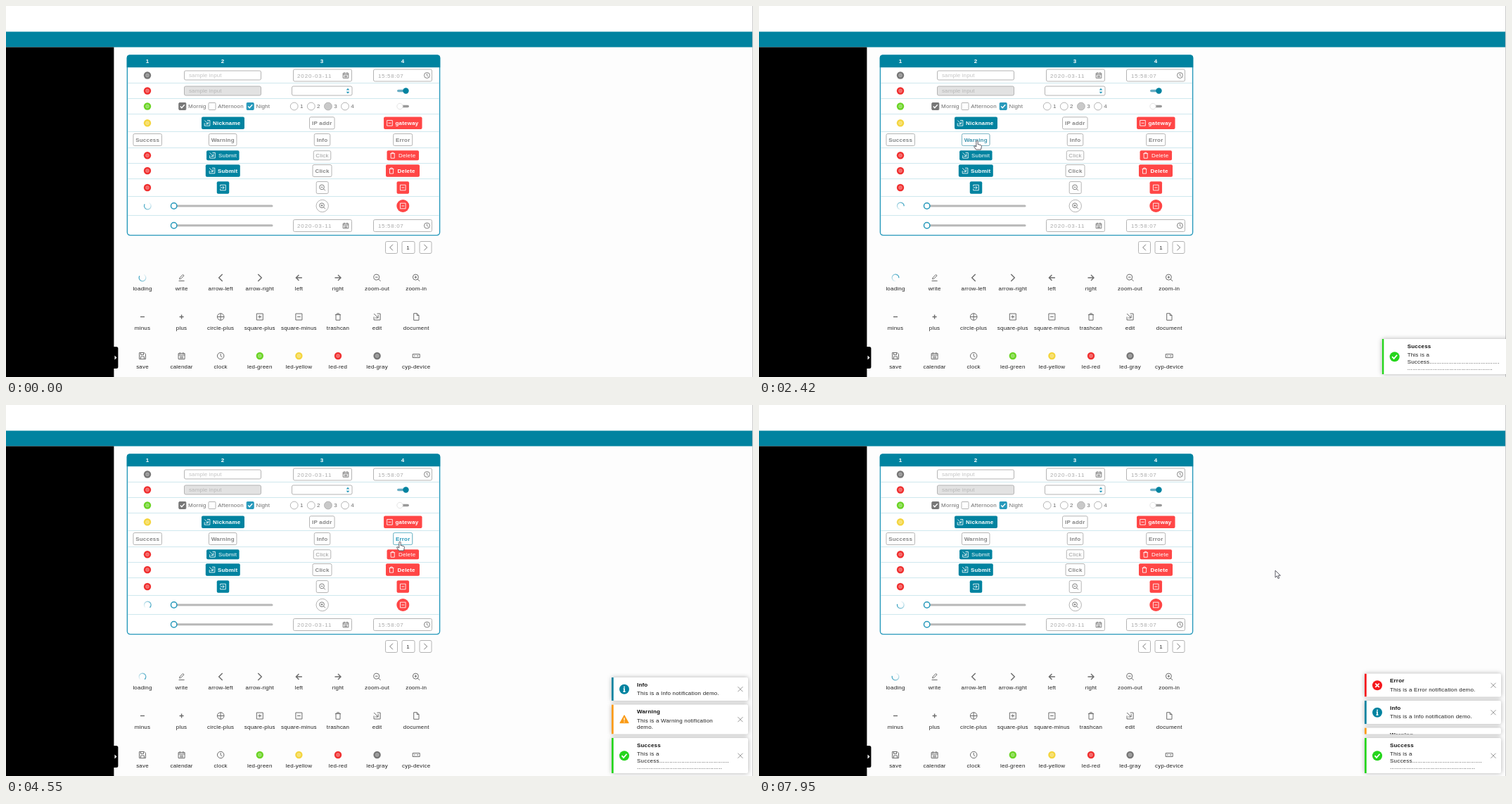
Write an HTML page that moves like this. It is 1062x527 px and loops after 8000 ms.

```html
<!DOCTYPE html>
<html lang="en">
<head>
<meta charset="utf-8">
<title>Component demo</title>
<style>
html, body { margin: 0; width: 100%; height: 100%; overflow: hidden; background: #fdfdfd; }
svg { position: absolute; left: 0; top: 0; }
text { font: 8px "Liberation Sans", Arial, sans-serif; white-space: pre; }
.b { font-weight: bold; }
.card { fill: #fff; filter: drop-shadow(0 0 3px rgba(0,0,0,.3)); }
</style>
</head>
<body>
<svg width="1062" height="527">
  <g id="page"></g>
  <g id="notes"></g>
  <path id="cursor" fill="#fff" stroke="#4a4a55" stroke-width=".9" stroke-linejoin="round"/>
</svg>
<script>
const TEAL = '#0083a0', BLUE = '#2799bb', RED = '#ff4646', GRAY = '#6c6c6c', EDGE = '#b4b4b4';
const LED = { green: '#6bd425', yellow: '#f4d53f', red: '#f03030', gray: '#777' };
const LOOP = 8000;

const ICON = {
  write: 'M-4 4.5H4M-3 2l.5-2L2-4.5 3.5-3-1 1.5z',
  'arrow-left': 'M2.5-5-2.5 0 2.5 5',
  'arrow-right': 'M-2.5-5 2.5 0-2.5 5',
  left: 'M4.5 0H-4M0-4-4 0 0 4',
  right: 'M-4.5 0H4M0-4 4 0 0 4',
  'zoom-out': 'M3.2-.8a4 4 0 1 1-8 0a4 4 0 1 1 8 0M2.1 2.1 5 5M-2.6-.8H1',
  'zoom-in': 'M3.2-.8a4 4 0 1 1-8 0a4 4 0 1 1 8 0M2.1 2.1 5 5M-2.6-.8H1M-.8-2.6V1',
  minus: 'M-3 0H3',
  plus: 'M-3 0H3M0-3V3',
  'circle-plus': 'M4.8 0a4.8 4.8 0 1 1-9.6 0a4.8 4.8 0 1 1 9.6 0M-4.8 0H4.8M0-4.8V4.8',
  'square-plus': 'M-4.5-4.5h9v9h-9zM-2.3 0H2.3M0-2.3V2.3',
  'square-minus': 'M-4.5-4.5h9v9h-9zM-2.3 0H2.3',
  trashcan: 'M-4-3H4M-1.5-3v-1.7h3V-3M-3-3V4.7H3V-3',
  edit: 'M0-4.5H4.5V4.5H-4.5V0M-4.5-4.5 1.5 1.5M-2.5 1.5h4v-4',
  document: 'M-3.5-4.8H1L3.8-2V4.8H-3.5zM1-4.8V-2H3.8',
  save: 'M-4.5-4.5H2.5L4.5-2.5v7h-9zM-2.5-4.5v3h4v-3M-2.5 4.5v-3.5h5v3.5',
  calendar: 'M-4.5-3.5h9v8h-9zM-4.5-1.2h9M-2.3-5v2.5M2.3-5v2.5M-2.5 1h5M-2.5 2.8h5',
  clock: 'M4.7 0a4.7 4.7 0 1 1-9.4 0a4.7 4.7 0 1 1 9.4 0M0-3V0L2 2',
  'cyp-device': 'M-5-2.5H5V2.5H-5zM-3.3 0h2M0 0h1M2.3-1v2',
  enter: 'M-4.5-2V-4.5H4.5V4.5H-4.5V2M-4.5 0H2M-.5-2.5 2 0-.5 2.5'
};

const rect = (x, y, w, h, fill = '#fff', stroke = EDGE, r = 2) =>
  `<rect x="${x}" y="${y}" width="${w}" height="${h}" rx="${r}" fill="${fill}" stroke="${stroke}"/>`;
const circle = (x, y, r, fill, stroke = 'none', w = 1) =>
  `<circle cx="${x}" cy="${y}" r="${r}" fill="${fill}" stroke="${stroke}" stroke-width="${w}"/>`;
const text = (s, x, y, fill = '#222', bold, mid, gap = .2) =>
  `<text x="${x}" y="${y}" fill="${fill}" class="${bold ? 'b' : ''}" text-anchor="${mid ? 'middle' : 'start'}" letter-spacing="${gap}">${s}</text>`;
const path = (d, x, y, color = GRAY, w = 1, scale = 1) =>
  `<path d="${d}" transform="translate(${x} ${y}) scale(${scale})" fill="none" stroke="${color}" stroke-width="${w}"/>`;
const icon = (name, x, y, color, w, scale) => path(ICON[name], x, y, color, w, scale);
const led = (c, x, y) => circle(x, y, 5.2, LED[c]) + circle(x, y, 2.4, 'rgba(255,255,255,.25)', 'rgba(255,255,255,.3)', .9);

// Outlined button centred on x
const plain = (s, x, y, w, h = 17, bold = true, color = '#858585', edge = EDGE) =>
  rect(x - w / 2, y - h / 2, w, h, '#fff', edge) + text(s, x, y + 2.9, color, bold, true);
// Filled button with an icon before its label
const solid = (s, x, y, w, h, fill, name, iconX, textX, bold) =>
  rect(x - w / 2, y - h / 2, w, h, fill, 'none') + icon(name, iconX, y, '#fff', 1, .85) + text(s, textX, y + 2.9, '#fff', bold);

function spinner(x, y) {
  let s = '';
  for (let i = 0; i < 12; i++)
    s += `<circle r="4.8" fill="none" stroke="${BLUE}" stroke-width="1.2" pathLength="360" stroke-dasharray="24 336"
      opacity="${.1 + i * .08}" transform="rotate(${-45 + i * 23})"/>`;
  return `<g transform="translate(${x} ${y})"><g class="spin">${s}</g></g>`;
}
const slider = y => `<path d="M239 ${y}H378" stroke="#b8b8b8" stroke-width="3" stroke-linecap="round"/>` +
  circle(238.7, y, 4.2, '#fff', BLUE, 1.5);
const dateTime = y =>
  rect(408.5, y - 8.5, 83, 17) + text('2020-03-11', 414, y + 3, '#aaa', 0, 0, .9) + icon('calendar', 483, y, GRAY, 1, .85) +
  rect(522.5, y - 8.5, 83, 17) + text('15:58:07', 529, y + 3, '#aaa', 0, 0, .65) + icon('clock', 598.5, y, GRAY, 1, .85);
const check = (x, fill, edge, label) => rect(x, 137.5, 10, 10, fill, edge, 1) +
  path('M-3 0-1 2.2 3-2.3', x + 5, 142.5, '#fff', 1.4) + text(label, x + 13.3, 145.4, GRAY);

const hoverButtons = [
  { label: 'Success', x: 201.2, w: 40.5, from: 930, to: 2130 },
  { label: 'Warning', x: 308.2, w: 39.5, from: 2230, to: 2800 },
  { label: 'Info', x: 449.5, w: 22.5, from: 2990, to: 3720 },
  { label: 'Error', x: 564.2, w: 27, from: 4080, to: 4690 }
];

function buildPage() {
  let s = `<path d="M0 0H1062V37H0z" fill="#fff"/><path d="M1061.5 0V527" stroke="#ccc"/>
    <path d="M0 36.4H1061V58.4H0z" fill="${TEAL}"/>
    <path d="M0 58.4H153.4V484h3.5q2.5 0 2.5 2.5v26q0 2.5-2.5 2.5h-3.5V527H0z"/><path d="M154.5 496.5 157.5 499.5 154.5 502.5z" fill="#fff"/>`;
  s += `<rect x="172.4" y="70" width="444.2" height="255.6" rx="4" fill="#fff" stroke="${BLUE}" stroke-width="1.4"/>
    <path d="M171.7 87.3V73.5q0-4 4-4H613.300q4 0 4 4V87.3z" fill="${TEAL}"/>`;
  [201, 308, 449, 564].forEach((x, i) => s += text(i + 1, x, 81, '#fff', true, true));
  for (const y of [109.5, 131.5, 153.5, 178.5, 201.5, 223.5, 245.5, 270.5, 297.5])
    s += `<path d="M173 ${y}H616" stroke="#cfe8ee"/>`;
  [['gray', 98.5], ['red', 120.5], ['green', 142.5], ['yellow', 166.3], ['red', 212.3], ['red', 234], ['red', 258]]
    .forEach(([c, y]) => s += led(c, 201, y));

  s += rect(253.5, 92, 109, 13) + text('sample input', 260, 101, '#c4c4c4', 0, 0, .1);
  s += rect(253.5, 114, 109, 13, '#e2e2e2') + text('sample input', 260, 123, '#b8b8b8', 0, 0, .1);
  s += dateTime(98.5) + dateTime(312);
  s += rect(406.5, 114, 85.5, 13) + `<path d="M483.7 119.5h4.6L486 116.8zM483.7 121.7h4.6L486 124.4z" fill="${BLUE}"/>`;
  s += rect(556, 118.7, 13, 3.6, '#68adc4', 'none') + circle(568.5, 120.5, 4.2, TEAL);
  s += rect(560, 140.8, 13, 3.4, '#999', 'none') + circle(560, 142.5, 4.2, '#fff', '#ddd', .8);

  s += check(245.8, '#777', '#777', 'Mornig') + check(288, '#fff', EDGE, 'Afternoon') + check(342.2, BLUE, BLUE, 'Night');
  for (let i = 0; i < 4; i++)
    s += circle(409.7 + 24.1 * i, 142.5, 5.4, i == 2 ? '#c9c9c9' : '#fff', EDGE) + text(i + 1, 418 + 24.1 * i, 145.4, GRAY);

  s += solid('Nickname', 308.5, 166.3, 61, 17.5, TEAL, 'edit', 286, 294, true) + plain('IP addr', 449.3, 166.3, 35.5) +
    solid('gateway', 564.3, 166.3, 54.5, 17.5, RED, 'square-minus', 545.5, 553.5, true);
  hoverButtons.forEach(b => s += plain(b.label, b.x, 190, b.w) +
    `<g class="hot" opacity="0">${plain(b.label, b.x, 190, b.w, 17, true, BLUE, '#6bb9cc')}</g>`);
  s += solid('Submit', 308.3, 212.2, 46.5, 14, TEAL, 'edit', 293.5, 302) + plain('Click', 449.5, 212.2, 24.5, 13, false, '#999') +
    solid('Delete', 564.3, 212.2, 45.5, 14, RED, 'trashcan', 549.7, 558);
  s += solid('Submit', 308.3, 234, 49, 17.5, TEAL, 'edit', 293, 301, true) + plain('Click', 449.5, 234, 27) +
    solid('Delete', 564, 234, 48, 17.5, RED, 'trashcan', 548, 556.5, true);
  s += solid('', 308.5, 258, 17.5, 17.5, TEAL, 'enter', 308.5, 0) + plain('', 449.7, 258, 17) + icon('zoom-out', 449.7, 258, GRAY, 1, .85) +
    solid('', 564.3, 258, 17.5, 17.5, RED, 'square-minus', 564.3, 0);
  s += spinner(201.3, 284) + slider(284) + circle(449.7, 284, 8.7, '#fff', EDGE) + icon('zoom-in', 449.7, 284, GRAY, 1, .85) +
    circle(564.3, 284, 9, RED) + icon('square-minus', 564.3, 284, '#fff', 1, .85);
  s += slider(311.7);

  s += rect(539.5, 334.5, 17, 17) + rect(563, 334.5, 18, 17) + rect(588, 334.5, 17, 17) + text('1', 571.5, 346, '#333', 0, true) +
    icon('arrow-left', 547.8, 343, GRAY, 1.1, .85) + icon('arrow-right', 596.5, 343, GRAY, 1.1, .85);

  ['loading write arrow-left arrow-right left right zoom-out zoom-in',
    'minus plus circle-plus square-plus square-minus trashcan edit document',
    'save calendar clock led-green led-yellow led-red led-gray cyp-device'].forEach((row, j) =>
    row.split(' ').forEach((name, i) => {
      const x = 194 + 55.6 * i, y = 386 + 55.5 * j;
      const bold = /^(arrow|left|right|minus|plus)/.test(name);
      s += name == 'loading' ? spinner(x, y) : name.startsWith('led') ? led(name.slice(4), x, y) : icon(name, x, y, GRAY, bold ? 1.4 : 1);
      s += text(name, x, y + 18.2, '#222', 0, true);
    }));
  page.innerHTML = s;
}

const disc = (color, mark) => y => circle(18, y, 7, color) + path(mark, 18, y, '#fff', 1.7);
const warnSign = y => `<path d="M18 ${y - 6}L24.2 ${y + 5}H11.8z" fill="#fa9a14" stroke="#fa9a14" stroke-linejoin="round"/>` +
  path('M0-2.5V1.5M0 2.7V4', 18, y, '#fff', 1.3);
const noteData = [
  { title: 'Success', lines: ['This is a', 'Success' + '.'.repeat(41), '.'.repeat(50)], y: 473, h: 50, color: '#25d51c', sign: disc('#25d51c', 'M-3.5 0-1 2.7 3.5-2.5'), at: 2220 },
  { title: 'Warning', lines: ['This is a Warning notification', 'demo.'], y: 425.5, h: 42, color: '#fa9a14', sign: warnSign, at: 2920 },
  { title: 'Info', lines: ['This is a Info notification demo.'], y: 387, h: 33, color: TEAL, sign: disc(TEAL, 'M0-4V-2.3M-1.2-.6H0V3.5M-1.5 3.5H1.5'), at: 3930 },
  { title: 'Error', lines: ['This is a Error notification demo.'], y: 348.5, h: 33, color: '#f5191e', sign: disc('#f5191e', 'M-2.7-2.7 2.7 2.7M2.7-2.7-2.7 2.7'), at: 4780 }
];

function noteMarkup(n) {
  const mid = n.h / 2 + .2;
  return `<g><rect class="card" width="194" height="${n.h}" rx="2"/><svg width="194" height="${n.h}" overflow="hidden">
    <path d="M0 0H2.7V${n.h}H0z" fill="${n.color}"/>` + n.sign(mid) + text(n.title, 36, 12.8, '#111', true) +
    n.lines.map((l, i) => text(l, 36, 25 + 9.5 * i)).join('') +
    path('M-3.5-3.5 3.5 3.5M3.5-3.5-3.5 3.5', 183, mid, '#888', .9) + '</svg></g>';
}

const ARROW = 'M0 0V10L2.4 7.8 4 11.5 5.7 10.8 4.1 7.2H7.3z';
const HAND = 'M-1.2 1a1.2 1.2 0 0 1 2.4 0V5l4 1q1.5.4 1.2 2l-.9 4.5H-1.4L-4.3 8.3q-.2-1.7 1.3-1l1.8 1.2z';
const route = [[70, 976, 480], [850, 221, 188], [1000, 208, 190], [2050, 208, 190], [2400, 310, 191.5], [2720, 310, 191.5],
  [3080, 448, 191], [3600, 448, 191], [3740, 462, 191], [4250, 560, 194.5], [4620, 560, 194.5], [5000, 738, 244], [5300, 734, 235]];

const clamp = v => Math.max(0, Math.min(1, v));
const smooth = v => v * v * (3 - 2 * v);

function cursorAt(t) {
  const i = route.findIndex(k => k[0] > t);
  if (i < 0) return route[route.length - 1].slice(1);
  const [a, x, y] = route[i - 1], [b, x2, y2] = route[i], p = smooth((t - a) / (b - a));
  return [x + (x2 - x) * p, y + (y2 - y) * p];
}

buildPage();
notes.innerHTML = noteData.map(noteMarkup).join('');
const spins = document.querySelectorAll('.spin'), hots = document.querySelectorAll('.hot');

function draw(t) {
  spins.forEach(g => g.setAttribute('transform', `rotate(${t * .36 - 20})`));
  hoverButtons.forEach((b, i) =>
    hots[i].setAttribute('opacity', clamp((t - b.from) / 250) * clamp(1 - (t - b.to) / 300)));

  // The warning folds up and the notes above it move down
  const fold = 42 * smooth(clamp((t - 7670) / 400));
  noteData.forEach((n, i) => {
    const g = notes.children[i];
    const x = 861 + 200 * (1 - clamp((t - n.at) / 400)) ** 3;
    g.style.display = t < n.at ? 'none' : '';
    g.setAttribute('transform', `translate(${x} ${n.y + (i ? fold : 0)})`);
    for (const part of g.children) part.setAttribute('height', n.h - (i == 1 ? fold : 0));
  });

  cursor.style.display = t < 70 ? 'none' : '';
  if (t >= 70) {
    cursor.setAttribute('d', hoverButtons.some(b => t >= b.from && t < b.to) ? HAND : ARROW);
    cursor.setAttribute('transform', `translate(${cursorAt(t)})`);
  }
}

const start = performance.now();
function loop() {
  draw((performance.now() - start) % LOOP);
  requestAnimationFrame(loop);
}
loop();
</script>
</body>
</html>
```
